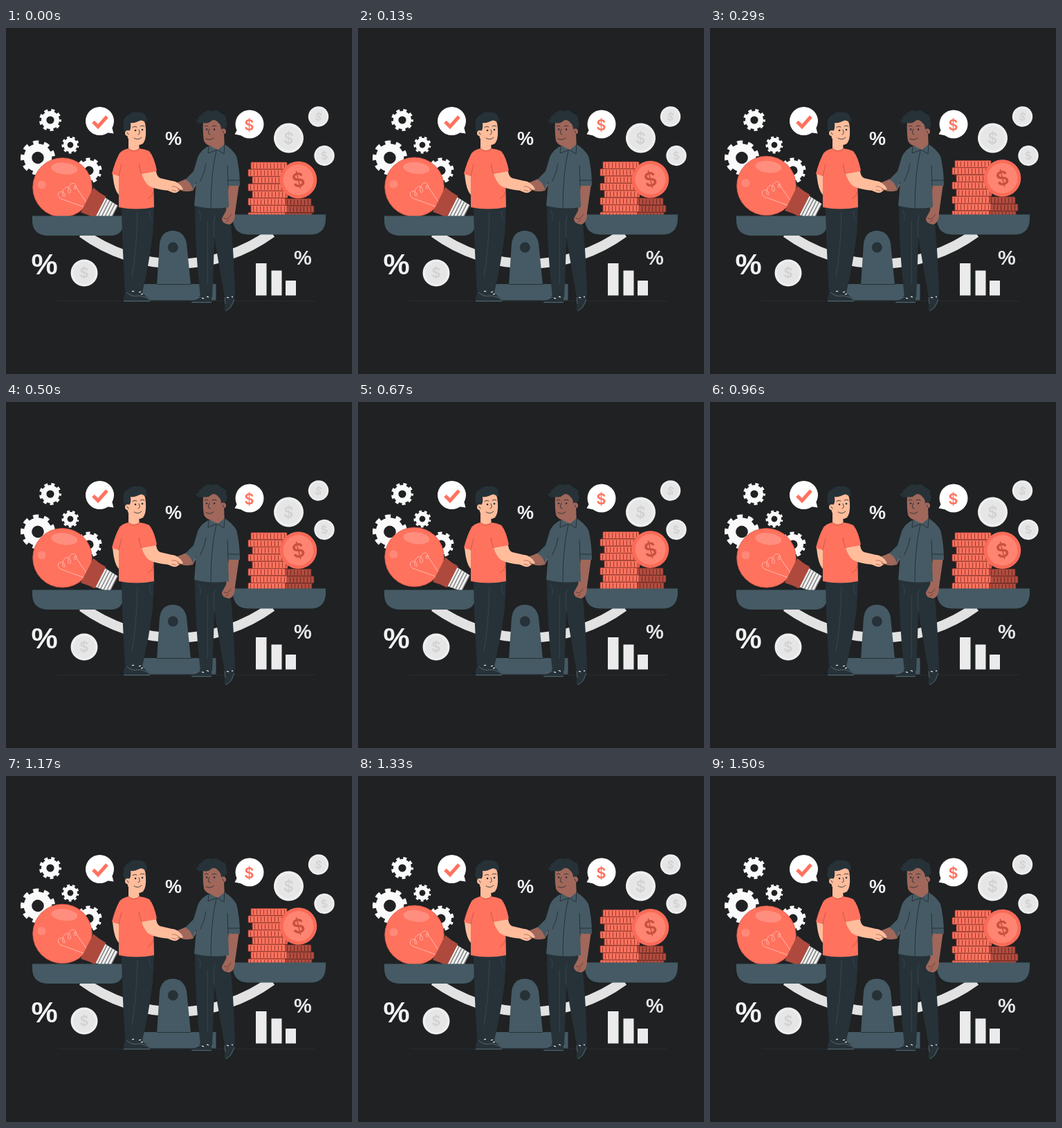
An HTML page for the animation above (1.54 s loop, 500x500 px).

```html
<!DOCTYPE html>
<html lang="en">
<head>
<meta charset="utf-8">
<title>Balanced deal</title>
<style>
  html, body { margin: 0; width: 100%; height: 100%; overflow: hidden; background: #1f2123; }
  svg { display: block; width: 100vw; height: 100vh; }
  text { font-family: "Liberation Sans", Arial, sans-serif; font-weight: bold; text-anchor: middle; }
  .money { font-family: Inter, sans-serif; font-weight: 600; }
  .slate { fill: #455a64; }
  .coral { fill: #ff725e; }
  .dark { fill: #263238; }
  .pale { fill: #ffbd9c; }
  .brown { fill: #a0675a; }
  .line { fill: none; stroke: #1d282d; stroke-width: .8; stroke-linecap: round; stroke-linejoin: round; }
  .seam { fill: none; stroke: #3b4b53; stroke-width: .8; }
  .fold { fill: none; stroke: #b84f42; stroke-width: .7; }
</style>
</head>
<body>
<svg viewBox="0 0 500 500">
  <defs>
    <g id="gear" fill="none" stroke="#fafafa">
      <circle r=".58" stroke-width=".46"/>
      <circle r=".88" stroke-width=".24" pathLength="16" stroke-dasharray="1 1" stroke-dashoffset=".5"/>
    </g>
  </defs>

  <use href="#gear" transform="translate(64 133) scale(16)"/>
  <use href="#gear" transform="translate(46 187.500) rotate(18) scale(25)"/>
  <use href="#gear" transform="translate(93 169) rotate(10) scale(12.500)"/>
  <use href="#gear" transform="translate(120 206) rotate(20) scale(18.500)"/>

  <g fill="#fff">
    <path d="M153 143L155.500 152.500L145 151Z"/>
    <circle cx="135.500" cy="134.500" r="20.500"/>
    <path d="M334 147L330.500 153.500L343 156Z"/>
    <circle cx="352" cy="139" r="20.500"/>
  </g>
  <path d="M126 135.500L133 142.500L146 128" fill="none" stroke="#ff725e" stroke-width="5"/>
  <text class="coral money" x="351.500" y="147.500" font-size="22">$</text>

  <g fill="#f2f2f2">
    <text x="242" y="169" font-size="27">%</text>
    <text x="55.500" y="356" font-size="43">%</text>
    <text x="429" y="341.500" font-size="29" fill="#e6e6e6">%</text>
    <path d="M361 340h15.500v46.500h-15.500zM383.500 350.500h15v36h-15zM404 365h15v21.500h-15z" fill="#ebebeb"/>
  </g>
  <g id="silver"></g>

  <path d="M75 394.500H447" stroke="#2a3439" stroke-width=".6"/>
  <path d="M110 296A233 233 0 0 0 384 296" fill="none" stroke="#e2e2e2" stroke-width="14"/>
  <rect class="slate" x="195" y="370" width="108.500" height="23.500"/>
  <path class="slate" d="M218 371L222 311Q225 293 241 293T261 311L267 371Z"/>
  <path class="line" d="M218 370.500H267"/>
  <circle class="dark" cx="241.300" cy="317" r="7.500"/>

  <g id="cargo">
    <g transform="translate(81.500 230.500)">
      <circle class="coral" r="42.800" stroke="#d9523f" stroke-width=".8"/>
      <ellipse cy="-27.500" rx="19" ry="8.500" fill="#fff" opacity=".2" transform="rotate(6)"/>
      <circle cx="-30" cy="-4" r="6" fill="#fff" opacity=".17"/>
      <path d="M33 29L-3 16C-11 9-2 2 3 9C6 16-2 14 1 5C4-3 11-2 12 5C12 11 6 8 9 0C12-8 20-8 20 0C19 5 15 2 18-3L37 25"
            fill="none" stroke="#ffc0b5" stroke-width=".9"/>
      <g transform="rotate(27)">
        <path d="M61-15L83-13V13L61 16Z" fill="#f0f0f0"/>
        <path d="M65-15V15.500M69.500-14.500V15M74-14V14.500M78.500-13.500V13.500M83-13V13" stroke="#777" stroke-width="1.300"/>
        <path d="M40-20Q51-17 62-17V18Q51 18 40 20Z" fill="#ad4a3d"/>
      </g>
    </g>
    <g id="stacks"></g>
  </g>

  <path class="slate" d="M38 271.500H170V283Q168 300 151 300H60Q38 299 38 278Z"/>
  <path class="slate" d="M328 269.500H462V277Q461 298.500 440 298.500H350Q329 298 328 277Z"/>

  <!-- left partner -->
  <g>
    <path class="dark" d="M167 260L214 259L212 298Q207 340 197 382L172 381Q168 315 167 260Z"/>
    <path class="seam" d="M190 266Q189 318 182 360M208 264Q206 275 212 278"/>
    <path class="dark" d="M173 379L196 379Q199 387 208 392V396H170V389Z"/>
    <path d="M170 394.500H208M174 382Q182 389 190 387Q199 386 208 393" fill="none" stroke="#53656e"/>
    <path d="M182 381l3-1M192 382l3-1M195 385l3-1" stroke="#fff" stroke-width="1.200"/>
    <path class="pale" d="M154 210H164L163 241Q156 234 154 210Z"/>
    <path class="pale" d="M177 160L192 165L193 181H177Z"/>
    <path class="coral" d="M177 174Q168 176 164 181Q157 194 153 211L163 214L163 259Q188 264 214 259L213 209L218 206Q214 186 207 178Q201 175 192 174Q185 180 177 174Z"/>
    <path class="fold" d="M163 214L167 197M196 211Q193 204 192 196M177 174Q185 182 193 174M205 247Q212 243 213 236"/>
    <path class="pale" d="M196 211L217 207Q218 215 223 217L240 221Q250 222 254 231Q250 238 242 238L236 235Q211 233 204 226Q199 220 196 211Z"/>
    <path class="pale" d="M175 139Q181 128 194 130Q202 133 202 146Q203 161 198 167Q189 172 181 166Q175 160 175 153Z"/>
    <path class="dark" d="M173 153Q168 144 170 137Q169 129 177 126Q182 120 190 122Q199 120 203 129Q205 134 202 137Q196 131 191 135Q184 138 180 137Q181 146 178 149Z"/>
    <circle class="pale" cx="176" cy="152" r="4"/>
    <path class="line" d="M183 143.500Q186 141 189 143M194 142Q197 140 200 142M192 147Q195 153 191 154M185 159Q191 163 196 158M175 151L177 154"/>
    <circle class="dark" cx="187" cy="148" r="1.300"/>
    <circle class="dark" cx="197" cy="147" r="1.300"/>
  </g>

  <!-- right partner -->
  <g>
    <path class="dark" d="M273 255L322 257Q329 310 331 387L316 389Q309 350 301 302Q300 350 298 389H281Q273 320 273 255Z"/>
    <path class="seam" d="M301 302Q299 282 302 271M278 263Q283 272 280 278M291 280L291 370"/>
    <path class="dark" d="M281 386H297V397.500H268Q269 393 276 392ZM316 386L330 387Q331 395 325 404L317 410Q314 406 317 399Z"/>
    <path d="M268 396.500H297M318 409L325 403L330 392M270 392L281 389M317 399L316 389" fill="none" stroke="#53656e"/>
    <path d="M283 390l3 1M290 388l3 1M319 389l3 1M326 388l2 1" stroke="#fff" stroke-width="1.200"/>
    <path class="brown" d="M322 225H337L331 267Q331 282 322 284Q311 282 312 275L318 264Z"/>
    <path class="line" d="M315 275Q321 278 325 270M318 281L322 277" style="stroke:#5e392f"/>
    <path class="brown" d="M267 215L275 226L270 235Q258 238 252 234L238 237Q234 234 239 230L248 223Q256 220 267 215Z"/>
    <path class="pale" d="M237 222Q244 219 253 228L256 233Q253 235 248 232Q251 239 242 238L234 235Z"/>
    <path class="line" d="M240 229Q246 228 251 233M240 234L246 236" style="stroke:#a9644d"/>
    <path class="brown" d="M296 161L315 152L316 177Q305 183 295 174Z"/>
    <path class="slate" d="M294 170Q281 176 277 187L271 207L259 219Q266 221 270 233L275 222L272 257Q298 263 322 259L321 228H338Q338 205 333 185Q327 175 316 168L306 176Z"/>
    <path class="line" d="M293 171L292 181L305 176L315 182L316 168M304 177Q296 210 296 259M281 221Q287 209 289 196M321 227L320 199M321 220H338"/>
    <path class="brown" d="M285 135Q292 127 306 130Q315 136 315 152Q312 166 303 170Q290 172 286 163Q284 150 285 135Z"/>
    <path class="dark" d="M285 137Q277 140 274 132L279 132Q276 127 283 125Q289 117 298 120Q306 117 311 124Q320 125 318 133Q322 139 316 146L314 152L311 147Q311 140 307 137Q302 131 297 134Q292 139 285 137Z"/>
    <circle class="brown" cx="314" cy="149.500" r="4"/>
    <path class="line" d="M287 142Q290 140 292 142M298 142Q301 140 304 142M294 146Q290 154 295 154M289 160Q295 163 300 159M313 149L315 152"/>
    <circle class="dark" cx="290" cy="146.500" r="1.300"/>
    <circle class="dark" cx="301" cy="146.500" r="1.300"/>
  </g>
</svg>

<script>
const get = id => document.getElementById(id);

const coin = (x, y, r, tilt, rim, face, mark) => `
  <g transform="translate(${x} ${y}) rotate(${tilt})">
    <circle r="${r}" fill="${rim}"/>
    <circle r="${r * .82}" fill="${face}"/>
    <text class="money" y="${r * .38}" font-size="${r * 1.05}" fill="${mark}">$</text>
  </g>`;

const silver = (x, y, r, tilt) => coin(x, y, r, tilt, '#efefef', '#e6e6e6', '#d2d2d2');

const STEP = 10.4;

// Coins seen edge-on, one per [left, right] pair, with dashed ridges
const stack = (top, spans, fill, ridge) => spans.map(([left, right], i) => {
  const y = top + i * STEP;
  return `<rect x="${left}" y="${y}" width="${right - left}" height="${STEP - .4}" rx="1"
      fill="${fill}" stroke="${ridge}" stroke-width=".8"/>
    <path d="M${left + 3} ${y + STEP / 2}H${right - 2}" stroke="${ridge}" stroke-width="7.500"
      stroke-dasharray="1 4"/>`;
}).join('');

get('silver').innerHTML = silver(113, 354, 19.5, 0) + silver(408.5, 159, 21.5, 4)
  + silver(451.5, 128, 14.7, 12) + silver(460, 184.5, 14.7, -8);

const wide = [354, 406], shifted = [350, 403.5], inset = [356, 407];
get('stacks').innerHTML =
  stack(246.5, [[403, 441], [402, 445], [404, 442]], '#b24c3f', '#6b2a22')
  + stack(194, [wide, shifted, inset, shifted, inset, shifted, wide, shifted], '#ff725e', '#963a2e')
  + coin(422.5, 219.5, 26.8, -14, '#f96b58', '#ff8472', '#c9503f');

const LOOP = 1540, LEAD = 40, LIFT = 6.5;
const cargo = get('cargo');

function draw(now) {
  const phase = 2 * Math.PI * (now % LOOP + LEAD) / LOOP;
  cargo.setAttribute('transform', `translate(0 ${-LIFT * (1 - Math.cos(phase)) / 2})`);
  requestAnimationFrame(draw);
}
draw(performance.now());
</script>
</body>
</html>
```
